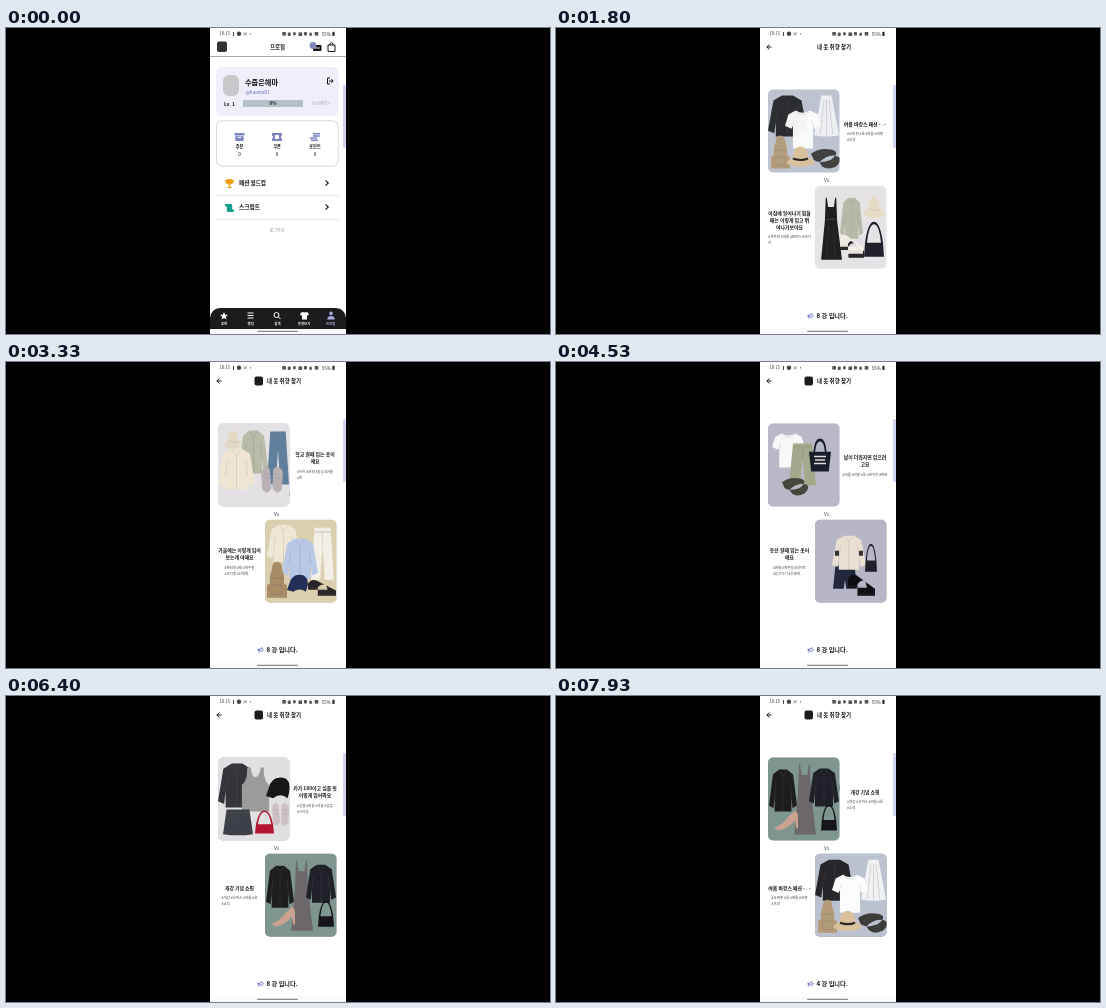
An HTML page with a canvas that plays this animation: 544 by 306 pixels, repeating every 8000 ms.

```html
<!DOCTYPE html>
<html lang="ko">
<meta charset="utf-8">
<title>옷 취향 찾기</title>
<style>
  html, body { margin: 0; width: 100%; height: 100%; overflow: hidden; background: #000; }
  canvas { display: block; width: 544px; height: 306px; }
</style>
<canvas id="stage" width="544" height="306"></canvas>
<script>
const c = document.getElementById('stage').getContext('2d');
const LOOP = 8000, INK = '#141414', VIOLET = '#7d83c4';

// Shapes live in a 10 x 10 box.
const SHAPES = {
  tee: 'M3 0Q5 1.2 7 0L9 1 10 4 8.2 4.8 7.8 4V10H2.2V4L1.8 4.8 0 4 1 1Z',
  tank: 'M2.3 0H3.3Q3.8 2.2 5 2.2T6.7 0H7.7Q7.5 3 9.4 4V10H.6V4Q2.5 3 2.3 0Z',
  jacket: 'M3.6 0H6.4L8.6 1.2 10 8.6 8.4 9.2 8 6.5V10H2V6.5L1.6 9.2 0 8.6 1.4 1.2Z',
  skirt: 'M3 0H7L10 9.7Q5 10.3 0 9.7Z',
  mini: 'M1.2 0H8.8L10 9.5Q5 10.4 0 9.5Z',
  pants: 'M1.5 0H8.5L10 10H6L5 3.5 4 10H0Z',
  shorts: 'M1 0H9L10 10H5.5L5 6 4.5 10H0Z',
  dress: 'M2.6 0H3.1L3.7 1.5H6.3L6.9 0H7.4L7.8 3.8 10 10H.5L2.2 3.8Z',
  hat: 'M0 7.5Q1 5.5 2.3 5.5 2.5 0 5 0 7.5 0 7.7 5.5 9 5.5 10 7.5 5 11 0 7.5Z',
  cap: 'M0 8L1 5Q2 0 6 0T10 5L9 9Q6 6.5 3 9Z',
  tote: 'M0 4H2Q2.5 0 5 0T8 4H10L9 10H1ZM2.8 4H7.2Q6.8 .8 5 .8T2.8 4Z',
  purse: 'M.5 6Q2 0 5 0T9.5 6L10 10H0ZM1.5 6H8.5Q7.5 .7 5 .7T1.5 6Z',
  pack: 'M2.5 2Q2.5 0 5 0T7.5 2L8.5 4V6L10 6.5V10H0V6.5L1.5 6V4Z',
  shoes: 'M0 3Q1 0 3 1L6.5 4 7 6.5H0ZM3.5 5Q5 2.5 6.5 4L10 7V10H3.5Z',
  sneakers: 'M0 2Q2 -1 4 1L4.8 8Q3 11 .6 8.5ZM5.6 1Q8 -1 10 2L9.5 8.5Q7 11 5.2 8Z',
  sandals: 'M0 3Q3 0 7 1T7 6Q3 8 1 6ZM3 7Q6 3 9 4T9 9Q6 11 4 9Z',
  heels: 'M0 8.5Q4 7 6 3L9 0 10 2V9H9.3L8.7 5Q6 9 2 10Z',
  star: 'M5 0L6.5 3.5 10 3.8 7.3 6.2 8.1 10 5 8 1.9 10 2.7 6.2 0 3.8 3.5 3.5Z',
  trophy: 'M2 0H8V1H10Q10 5 7 5.5L5.7 6.5V8.5H7.5V10H2.5V8.5H4.3V6.5L3 5.5Q0 5 0 1H2Z',
  scroll: 'M0 0H7Q8 0 8 2V7H10V9Q10 10 8 10H4Q2 10 2 8V3H0Z',
  box: 'M0 0H10V3H0ZM.8 4H9.2V10H.8ZM3.5 5V6.3H6.5V5Z',
  ticket: 'M0 0H10V3Q8 5 10 7V10H0V7Q2 5 0 3ZM3 2.5V7.5H7V2.5Z',
  coins: 'M3 0H10V2H3ZM3 2.7H10V4.7H3ZM0 5.3H7V7.3H0ZM1 8H8V10H1Z',
  horn: 'M0 3H3L8 0V9L3 6.5V10H1.5V6.5H0ZM4 4V5.5L6.8 7V2.4ZM9 3H10V6H9Z',
  person: 'M5 0A2.4 2.4 0 0 1 5 4.8 2.4 2.4 0 0 1 5 0ZM0 10Q0 5.6 5 5.6T10 10Z'
};
const SEAMS = {
  jacket: 'M3.8 .4L5 1.6 6.2 .4M5 1.6V10M2 6.5L2.5 3M8 6.5L7.5 3',
  tee: 'M3.2 .4Q5 1.8 6.8 .4M2.2 4L2.5 2.6M7.8 4L7.5 2.6',
  skirt: 'M4 1L2.5 9.5M5 1V9.7M6 1L7.5 9.5',
  mini: 'M1 1.2H9M5 1.2V4',
  pants: 'M1.5 .8H8.5M5 .8V3.5',
  dress: 'M2.4 3.5H7.6M4 4.5L3 9.8M6 4.5L7 9.8',
  pack: 'M1.5 4.5H8.5M2.5 6.5H7.5V9H2.5Z',
  hat: 'M2.3 5.4Q5 6.6 7.7 5.4',
  shoes: 'M0 5.8H6M4 9.2H10',
  sneakers: 'M1.5 3H3.5M1.5 4.5H3.8M6.5 3H8.5M6.2 4.5H8.5',
  sandals: 'M2 4L5 2M6 8L9 6'
};
const toPaths = set => Object.fromEntries(Object.entries(set).map(([k, d]) => [k, new Path2D(d)]));
const paths = toPaths(SHAPES), seams = toPaths(SEAMS);

function shape(kind, color, x, y, w, h, seam = false) {
  c.save();
  c.translate(x, y);
  c.scale(w / 10, h / 10);
  c.fillStyle = color;
  c.fill(paths[kind], 'evenodd');
  if (seam && seams[kind]) {
    c.strokeStyle = 'rgba(110,110,115,.3)';
    c.lineWidth = 6 / w;
    c.stroke(seams[kind]);
  }
  c.restore();
}
function rect(x, y, w, h, color, radius = 0) {
  c.fillStyle = color;
  c.beginPath();
  c.roundRect(x, y, w, h, radius);
  c.fill();
}
function disc(x, y, r, color) {
  c.fillStyle = color;
  c.beginPath();
  c.arc(x, y, r, 0, 7);
  c.fill();
}
function line(d, color = INK, width = 1) {
  c.strokeStyle = color;
  c.lineWidth = width;
  c.stroke(new Path2D(d));
}
function text(s, x, y, size, { weight = 400, color = INK, align = 'left' } = {}) {
  c.font = `${weight} ${size}px "Noto Sans CJK KR", "Noto Sans CJK", sans-serif`;
  c.textAlign = align;
  c.textBaseline = 'middle';
  c.fillStyle = color;
  c.fillText(s, x, y);
}
const bold = (s, x, y, size, align = 'left') => text(s, x, y, size, { weight: 700, align });

// Each garment: kind, colour, x, y, width, height inside a 72 x 83 picture.
const outfits = {
  summer: { bg: '#bcc1cf', title: ['여름 바캉스 패션 - . -'], tags: ['#오버핏 #룩 #여름 #여행', '#휴양'], items: [
    ['jacket', '#27272b', 0, 6, 39, 41], ['skirt', '#f1f1f4', 46, 6, 25, 41], ['tee', '#fcfcfc', 17, 21, 36, 38],
    ['pack', '#b39a78', 3, 46, 19, 33], ['hat', '#dac29c', 18, 57, 29, 22], ['sandals', '#3d3c3b', 43, 58, 28, 21]] },
  dress: { bg: '#e5e2e5', title: ['아침에 일어나기 힘들', '때는 이렇게 입고 뛰', '어나가보아요'], tags: ['#캐주얼 #여름 #원피스 #데이', '트'], items: [
    ['dress', '#17171a', 5, 12, 22, 62], ['jacket', '#b5b9a7', 25, 12, 23, 41], ['hat', '#e6dcc4', 48, 11, 22, 23],
    ['shoes', '#1c1b1d', 25, 50, 24, 22], ['shoes', '#f6f2e9', 25, 48, 23, 20], ['purse', '#1a1a24', 49, 36, 20, 35]] },
  school: { bg: '#e4e1e5', title: ['학교 갈때 입는 옷이', '에요'], tags: ['#아이 #여행 #일상 #여름', '#학'], items: [
    ['hat', '#e2d8c6', 5, 7, 20, 20], ['jacket', '#b7bba8', 21, 7, 29, 43], ['pants', '#5f7f9c', 49, 8, 22, 53],
    ['jacket', '#eee6d2', 0, 25, 37, 41], ['sneakers', '#b9b2b4', 43, 43, 22, 27]] },
  autumn: { bg: '#dacfae', title: ['가을에는 이렇게 입어', '보는게 어때요'], tags: ['#패션왕 #룩 #캐주얼', '#코디왕 #산책룩'], items: [
    ['jacket', '#efe8d7', 2, 5, 33, 37], ['pants', '#f3efe6', 46, 8, 23, 52], ['jacket', '#b9c8e4', 17, 19, 36, 40],
    ['pack', '#a88c66', 2, 42, 20, 36], ['cap', '#232f57', 22, 55, 21, 19], ['shoes', '#2a2526', 43, 59, 28, 17]] },
  warm: { bg: '#b9b8c6', title: ['날이 더워지면 입으려', '고요'], tags: ['#여름 #여행 #룩 #데이트 #편한'], items: [
    ['tee', '#f8f8f8', 4, 10, 33, 34], ['pants', '#a3a98a', 21, 20, 27, 42], ['tote', '#1b1e2a', 41, 15, 22, 33],
    ['sandals', '#45463c', 14, 53, 25, 19]] },
  hike: { bg: '#b7b6c6', title: ['등산 갈때 입는 옷이', '에요'], tags: ['#여행 #캐주얼 #데이트', '#등산가기 #산행룩'], items: [
    ['shorts', '#23283c', 18, 46, 24, 23], ['jacket', '#e9e0d2', 17, 16, 34, 34], ['purse', '#20202a', 50, 24, 12, 28],
    ['shoes', '#0f0f13', 33, 53, 27, 23]] },
  simple: { bg: '#e0dfe1', title: ['키가 180이고 심플 핏', '이렇게 입어봐요'], tags: ['#심플 #여름 #외출 #훈훈', '#스타일'], items: [
    ['jacket', '#34343a', 0, 6, 38, 44], ['tank', '#9b9b9c', 22, 10, 31, 44], ['cap', '#17171a', 48, 20, 24, 23],
    ['mini', '#3e4048', 5, 52, 30, 26], ['purse', '#b3152e', 37, 53, 19, 23], ['sneakers', '#cdbfc2', 54, 45, 17, 24]] },
  term: { bg: '#7f9690', title: ['개강 기념 쇼핑'], tags: ['#개강 #오피스 #여름 #룩', '#쇼핑'], items: [
    ['jacket', '#1d1d20', 1, 12, 28, 42], ['dress', '#6c676a', 25, 7, 23, 70], ['jacket', '#1f2028', 41, 11, 30, 38],
    ['heels', '#c9a292', 6, 53, 24, 20], ['purse', '#16161a', 53, 47, 16, 26]] }
};
const rounds = [
  { at: 1590, top: 'summer', bottom: 'dress', left: 8 },
  { at: 3110, top: 'school', bottom: 'autumn', left: 8 },
  { at: 3930, top: 'warm', bottom: 'hike', left: 8 },
  { at: 5330, top: 'simple', bottom: 'term', left: 8 },
  { at: 6930, top: 'term', bottom: 'summer', left: 4 }
];

function picture(name, x, y, alpha) {
  const { bg, items } = outfits[name];
  c.save();
  c.globalAlpha *= alpha;
  c.translate(x, y);
  rect(0, 0, 71.5, 83, bg, 5);
  c.clip();
  for (const item of items) shape(...item, true);
  if (name === 'warm') line('M46 33H58M47 36.5H57M46 40H58', '#ddd', 1.3);
  if (name === 'hike') line('M22 31V36M46 31V36', '#333', 4);
  if (name === 'summer') line('M25 69Q33 72 40 69', '#2a2622', 2.2);
  c.restore();
}
function caption(name, x, middle) {
  const { title, tags } = outfits[name];
  let y = middle - (title.length * 7 + 3 + (tags.length - 1) * 6) / 2;
  for (const row of title) { bold(row, x, y, 4.9, 'center'); y += 7; }
  y += 3;
  c.font = '400 3.5px "Noto Sans CJK KR", "Noto Sans CJK", sans-serif';
  const left = x - c.measureText(tags[0]).width / 2;
  for (const row of tags) { text(row, left, y, 3.5, { color: '#444' }); y += 6; }
}

function profilePage() {
  rect(204, 0, 136, 301, '#fff');
  rect(211, 13.5, 10, 10.5, '#333', 2);
  bold('프로필', 271.5, 18.5, 5.5, 'center');
  rect(307, 17, 8.5, 6, INK, 1);
  disc(307, 17.5, 3.4, '#8087bd');
  line('M309 20H314', '#fff', .8);
  line('M322 17H329V23.5H322ZM323.8 17Q324 14.5 325.5 14.5T327.2 17', INK, 1);
  rect(204, 28, 136, 1, '#aaa');

  rect(210, 39, 122.5, 49, '#efeefa', 6);
  rect(217, 47, 16, 21, '#c8c8ca', 6);
  bold('수줍은해마', 239, 54, 7.2);
  text('@haema01', 239.5, 64, 4.6, { color: '#6269c0' });
  line('M324 50H321.5V56H324M323 53H327M325.4 51.2L327.2 53 325.4 54.8', INK, 1);
  bold('Lv. 1', 218, 76, 4.8);
  rect(237, 72, 60, 7, '#b6c0c9');
  bold('0%', 267, 75.5, 4.4, 'center');
  text('등급혜택 >', 324, 75.7, 4.1, { color: '#aaa', align: 'right' });

  rect(210, 92.5, 122.5, 46, '#ccc', 6);
  rect(210.7, 93.2, 121.1, 44.6, '#fff', 5.4);
  [['주문', 'box', 233.5], ['쿠폰', 'ticket', 271], ['포인트', 'coins', 309]].forEach(([label, icon, x]) => {
    shape(icon, VIOLET, x - 5, 105, 10, 8);
    bold(label, x, 118.5, 4.2, 'center');
    text('0', x, 126, 4.6, { align: 'center' });
  });

  shape('trophy', '#f0a21c', 219, 151, 9, 9);
  bold('패션 월드컵', 233, 155, 5.6);
  shape('scroll', '#15a08c', 219, 176, 9, 8);
  bold('스크립트', 233, 179, 5.7);
  for (const y of [155, 179]) line(`M319.5 ${y - 2.7}L322.3 ${y} 319.5 ${y + 2.7}`, INK, 1.1);
  for (const y of [167, 191]) rect(210, y, 122.5, .8, '#ddd');
  text('로그아웃', 271, 202, 4.1, { color: '#888', align: 'center' });

  rect(204, 280, 136, 21, '#1c1c1e', [10, 10, 0, 0]);
  shape('star', '#fff', 214, 284, 8, 7.5);
  line('M241.5 285H247.5M241.5 287.5H247.5M241.5 290H247.5', '#fff', 1);
  line('M273 287A2.5 2.5 0 1 1 268 287A2.5 2.5 0 1 1 273 287M272.3 288.8L274.5 291', '#fff', 1);
  shape('tee', '#fff', 294, 284, 9, 7.5);
  shape('person', '#a7abe0', 321.3, 283.5, 7.5, 8);
  ['추천', '랭킹', '검색', '옷장보기', '프로필'].forEach((label, i) =>
    text(label, 218 + i * 26.7, 295.3, 3.4, { weight: 700, color: i === 4 ? '#a7abe0' : '#fff', align: 'center' }));
}

function matchPage(t) {
  rect(204, 0, 136, 301, '#fff');
  line('M215.5 19H211M213.3 16.5L210.8 19 213.3 21.5', INK, 1);
  bold('내 옷 취향 찾기', 261, 19, 5.5);
  if (t >= 1930) rect(248.5, 14.5, 8.5, 9, '#1c1c1c', 2);

  const index = rounds.findLastIndex(r => t >= r.at), now = rounds[index], before = rounds[index - 1];
  shape('horn', VIOLET, 251.5, 285, 6.2, 5.8);
  bold(`${now ? now.left : 8} 강 입니다.`, 260.5, 288, 6.2);
  if (!now) {
    text('.', 271, 37, 5, { color: '#888', align: 'center' });
    text('취향 기다리는 설명 페이지', 271, 57.5, 3.8, { color: '#a9a9bb', align: 'center' });
    return;
  }
  const fade = Math.min(1, (t - now.at) / 220);
  for (const [round, alpha] of [[before, 1], [now, fade]]) {
    if (!round) continue;
    picture(round.top, 212, 61.5, alpha);
    picture(round.bottom, 259, 157.7, alpha);
  }
  caption(now.top, 309, 103.7);
  caption(now.bottom, 233.5, 200);
  text('Vs.', 271.3, 152, 5, { color: '#444b60', align: 'center' });
}

function systemBars(dim) {
  text('10:15', 213.5, 5.8, 4.2, { color: '#333' });
  rect(227, 4, 1, 4, '#444');
  disc(233, 5.8, 2.2, '#444');
  line('M237.8 4.3L240.8 7.3M240.8 4.3L237.8 7.3', '#555', .7);
  disc(244.5, 5.8, .6, '#333');
  for (let i = 0; i < 7; i++) rect(276.3 + i * 5.4, 4 + i % 2 * .4, 3.6 - i % 3 * .5, 3.6, '#555', i % 3);
  text('55%', 325, 5.8, 4.6, { color: '#333', align: 'right' });
  rect(326.3, 3.8, 2.3, 4.2, '#333', .6);
  rect(337, 57, 3, 63, '#d0d4f0', 1);
  if (dim) rect(337, 57, 3, 63, `rgba(0,0,0,${dim})`, 1);
  rect(204, 301, 136, 5, '#f9f9f9');
  rect(251, 302.7, 41, 1.2, '#8c8c8c', .6);
}

function draw(t) {
  rect(0, 0, 544, 306, '#000');
  const open = Math.min(1, Math.max(0, (t - 1290) / 450));
  const scale = 1 - .15 * (1 - open) ** 3;
  const dim = open < 1 ? .38 * Math.min(1, open * 4) : 0;
  c.save();
  c.beginPath();
  c.rect(204, 0, 136, 306);
  c.clip();
  if (open < 1) profilePage();
  if (open > 0) {
    rect(204, 0, 136, 301, `rgba(0,0,0,${dim})`);
    c.translate(271.3, 150.5);
    c.scale(scale, scale);
    c.translate(-271.3, -150.5);
    c.globalAlpha = Math.min(1, open * 5);
    matchPage(t);
  }
  c.restore();
  systemBars(dim);
}

const start = performance.now();
(function tick() {
  draw((performance.now() - start) % LOOP);
  requestAnimationFrame(tick);
})();
</script>
</html>
```
